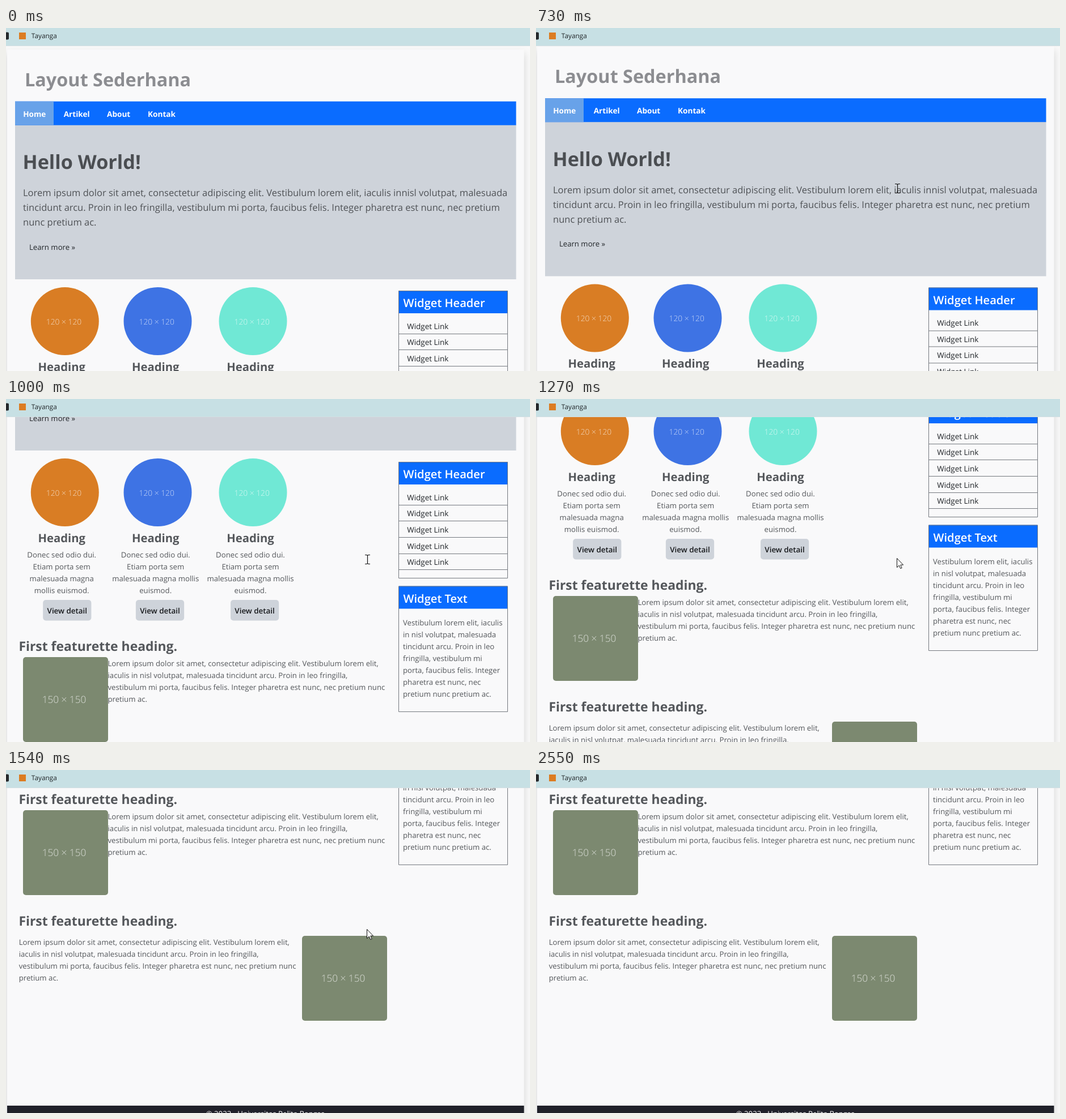
Animation of 924x606 px, one loop 2.88 s. Source, as an HTML page:

```html
<!DOCTYPE html>
<html lang="id">
<head>
<meta charset="utf-8">
<title>Layout Sederhana</title>
<style>
  html, body { margin: 0; width: 100%; height: 100%; overflow: hidden; background: #f9f9f9; }
  svg { display: block; width: 924px; height: 606px; }
  text {
    font-family: "Open Sans", "Noto Sans", sans-serif; font-size: 13.2px; fill: #54575b;
    white-space: pre; text-rendering: geometricPrecision;
  }
  .sheet { fill: #f9f9fa; filter: drop-shadow(0 7px 7px rgba(0, 0, 0, .15)); }
  .title { font-size: 32.4px; font-weight: 700; fill: #8c8d91; }
  .hello { font-size: 34.2px; font-weight: 700; fill: #4b4e52; }
  .lead { font-size: 16.5px; fill: #4f5256; }
  .nav { font-size: 13.6px; font-weight: 700; fill: #fff; }
  .heading { font-size: 20.3px; font-weight: 700; }
  .feature { font-size: 22.9px; font-weight: 700; }
  .head { font-size: 20.1px; font-weight: 600; fill: #fff; }
  .link { font-size: 13.5px; fill: #212529; }
  .dark { fill: #212529; }
  .button { font-size: 13.4px; font-weight: 600; fill: #17191c; }
  .small { font-size: 13.8px; font-weight: 300; fill: rgba(255, 255, 255, .72); }
  .large { font-size: 17.2px; font-weight: 300; fill: rgba(255, 255, 255, .72); }
  .foot { fill: #fff; }
  .tab { font-size: 11.8px; fill: #202427; }
  .mid { text-anchor: middle; }
  .line { fill: none; stroke: #74797f; }
</style>
</head>
<body>
<svg viewBox="0 0 924 606">
  <g id="page"></g>
  <g id="bar"></g>
  <path id="arrow" d="M.5 .5V16.6L4.3 13L6.7 18.5L9.1 17.5L6.8 12.1H11.6Z" fill="#fff" stroke="#111"/>
  <path id="beam" d="M-4 -7.5H-1L.5 -6.5L2 -7.5H5M-4 8.5H-1L.5 7.5L2 8.5H5M.5 -6.5V7.5" fill="none" stroke="#111" stroke-width="1.2"/>
</svg>
<script>
const LOOP = 2880;
const BLUE = '#0a6cff', GREY = '#ced3da', GREEN = '#7c8970';
const $ = id => document.getElementById(id);

function add(parent, tag, attrs, content) {
  const el = document.createElementNS('http://www.w3.org/2000/svg', tag);
  for (const key in attrs) el.setAttribute(key, attrs[key]);
  if (content) el.textContent = content;
  parent.appendChild(el);
}
const page = $('page'), bar = $('bar');
const rect = (x, y, width, height, fill, rx = 0) =>
  add(page, 'rect', { x, y, width, height, fill, rx });
const text = (x, y, cls, str) => add(page, 'text', { x, y, class: cls }, str);
const lines = (x, y, step, cls, rows) =>
  rows.forEach((row, i) => text(x, y + i * step, cls, row));
const line = d => add(page, 'path', { d, class: 'line' });

add(page, 'rect', { x: 2, y: 38, width: 911.5, height: 1340, class: 'sheet' });
text(33, 102.8, 'title', 'Layout Sederhana');

// Navigation and hero
rect(16, 171, 883.5, 273, GREY);
rect(16, 129.7, 883.5, 42, BLUE);
rect(16, 129.7, 68, 42, '#68a2e9');
[['Home', 30.2], ['Artikel', 101.7], ['About', 178], ['Kontak', 250]]
  .forEach(([label, x]) => text(x, 156.5, 'nav', label));
text(29.5, 249, 'hello', 'Hello World!');
lines(30, 297, 26.1, 'lead', [
  'Lorem ipsum dolor sit amet, consectetur adipiscing elit. Vestibulum lorem elit, iaculis innisl volutpat, malesuada',
  'tincidunt arcu. Proin in leo fringilla, vestibulum mi porta, faucibus felis. Integer pharetra est nunc, nec pretium',
  'nunc pretium ac.'
]);
text(40.9, 391.5, 'dark', 'Learn more »');

// Three columns
const wide = ['Donec sed odio dui.', 'Etiam porta sem', 'malesuada magna mollis', 'euismod.'];
const narrow = ['Donec sed odio dui.', 'Etiam porta sem', 'malesuada magna', 'mollis euismod.'];
[
  [103.8, 98.2, 107.8, '#d97d24', narrow],
  [267.5, 263.7, 271.5, '#3e73e4', wide],
  [435.5, 431, 438.6, '#70e8d5', wide]
].forEach(([cx, mid, btn, fill, rows]) => {
  add(page, 'circle', { cx, cy: 518, r: 60, fill });
  text(cx - 1.8, 523.5, 'small mid', '120 × 120');
  text(mid, 605.5, 'heading mid', 'Heading');
  lines(mid, 633, 21, 'mid', rows);
  rect(btn - 42.6, 708, 85.2, 36.5, GREY, 5);
  text(btn, 732, 'button mid', 'View detail');
});

// Featurettes
const story = [
  'Lorem ipsum dolor sit amet, consectetur adipiscing elit. Vestibulum lorem elit,',
  'iaculis in nisl volutpat, malesuada tincidunt arcu. Proin in leo fringilla,',
  'vestibulum mi porta, faucibus felis. Integer pharetra est nunc, nec pretium nunc',
  'pretium ac.'
];
[[798, 30, 809, 179.5, 825], [1012.5, 522, 1031, 22.7, 1047]].forEach(([hy, ix, iy, tx, ty]) => {
  text(22.4, hy, 'feature', 'First featurette heading.');
  rect(ix, iy, 150, 150, GREEN, 5);
  text(ix + 72.5, iy + 81, 'large mid', '150 × 150');
  lines(tx, ty, 21.1, '', story);
});

// Sidebar
function widget(y, height, title) {
  rect(692.5, y, 192, 40, BLUE);
  line(`M692.5 ${y + .5}H884.5V${y + height + .5}H692.5Z`);
  text(700.5, y + 29, 'head', title);
}
widget(464, 205, 'Widget Header');
for (let i = 0; i < 5; i++) {
  text(707.2, 531.5 + 28.7 * i, 'link', 'Widget Link');
  line(`M692.5 ${Math.round(539.5 + 28.7 * i) + .5}H884.5`);
}
widget(683.5, 221.5, 'Widget Text');
lines(700, 753, 21, '', [
  'Vestibulum lorem elit, iaculis', 'in nisl volutpat, malesuada', 'tincidunt arcu. Proin in leo',
  'fringilla, vestibulum mi', 'porta, faucibus felis. Integer', 'pharetra est nunc, nec',
  'pretium nunc pretium ac.'
]);

rect(2, 1331, 911.5, 40, '#20212a');
text(457.5, 1350, 'foot mid', '© 2023 - Universitas Pelita Bangsa');

// Bookmarks bar
add(bar, 'rect', { width: 924, height: 31, fill: '#c7e0e4' });
add(bar, 'rect', { y: 31, width: 924, height: 1, fill: '#d3dfe2' });
add(bar, 'rect', { x: -8, y: 7.5, width: 13, height: 13, rx: 2, fill: '#25292c' });
add(bar, 'rect', { x: 23, y: 8, width: 12, height: 12, fill: '#dc7c22' });
add(bar, 'text', { x: 44.8, y: 18, class: 'tab' }, 'Tayanga');

// [time, scroll offset]
const scrolls = [
  [0, 0], [730, 5.5], [790, 52], [860, 148], [930, 258], [1000, 353], [1070, 415], [1140, 446],
  [1210, 456], [1270, 461], [1330, 596], [1400, 731], [1470, 736], [1540, 738]
];
// [time, pointer, x, y]
const moves = [
  [0, ''], [180, 'arrow', 842, 573], [250, 'arrow', 820, 540], [320, 'arrow', 775, 466],
  [390, 'arrow', 716, 386], [460, 'beam', 672, 328], [530, 'beam', 648, 296],
  [600, 'beam', 637, 283], [1210, 'arrow', 636, 281],
  [2000, 'arrow', 646, 285], [2070, 'arrow', 668, 302], [2140, 'arrow', 702, 334],
  [2200, 'arrow', 742, 380], [2270, 'arrow', 786, 438], [2340, 'arrow', 826, 500],
  [2410, 'arrow', 860, 556], [2480, 'arrow', 884, 595], [2550, '']
];
const at = (steps, t) => steps.findLast(step => step[0] <= t);

function draw(t) {
  page.setAttribute('transform', `translate(0 ${-at(scrolls, t)[1]})`);
  const [, kind, x, y] = at(moves, t);
  for (const id of ['arrow', 'beam']) {
    $(id).setAttribute('visibility', id === kind ? 'visible' : 'hidden');
    if (id === kind) $(id).setAttribute('transform', `translate(${x} ${y})`);
  }
}

const start = performance.now();
function tick() {
  draw((performance.now() - start) % LOOP);
  requestAnimationFrame(tick);
}
draw(0);
requestAnimationFrame(tick);
</script>
</body>
</html>
```
